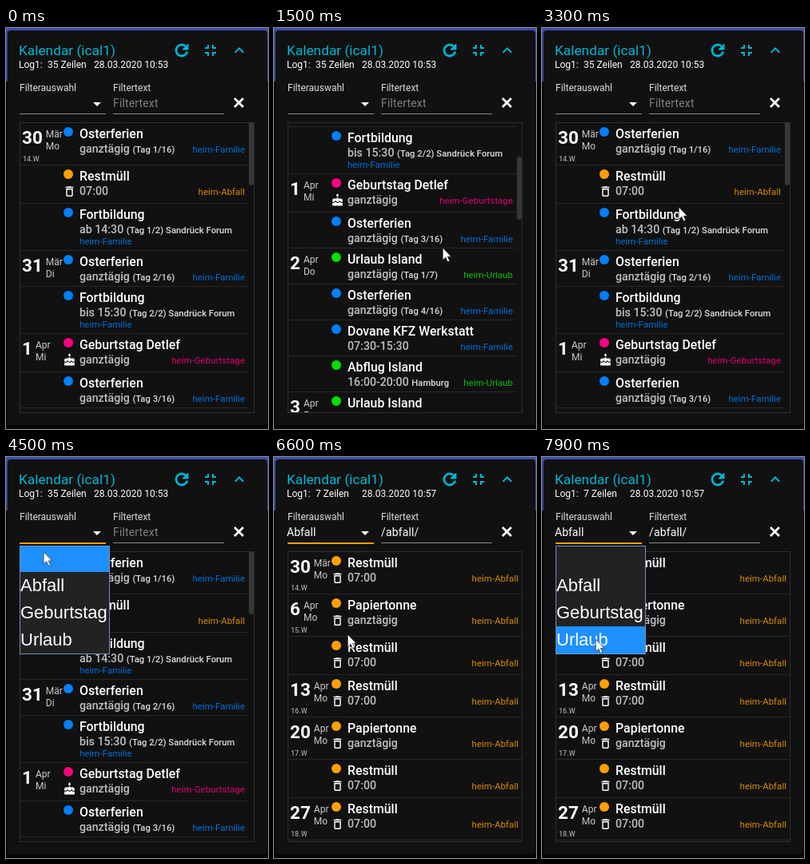
These frames come from a looping animation (328 px wide and 502 px high, 8000 ms). An HTML page:

```html
<!DOCTYPE html>
<html lang="de">
<head>
<meta charset="utf-8">
<title>Kalendar</title>
<style>
@property --y { syntax: "<number>"; inherits: true; initial-value: 0; }

html, body { margin: 0; width: 100%; height: 100%; overflow: hidden; background: #080808; }
#stage { position: relative; width: 328px; height: 502px; overflow: hidden; color: #fff;
  font-family: Roboto, sans-serif; white-space: pre;
  background: linear-gradient(#3f51b5 67px, #080808 67px); }
#stage * { box-sizing: border-box; }
.abs, .row > *, #stage > * { position: absolute; }
svg { display: block; overflow: visible; }

.card { left: 2px; top: 3px; width: 325px; height: 494px; border-radius: 4px; background: #111;
  box-shadow: 0 2px 4px rgba(0, 0, 0, .5); }
.head { left: 16px; top: 18px; font-size: 17.3px; line-height: 20px; color: #00b8d4; }
.log { top: 38px; font-size: 12px; line-height: 16px; }
.label { top: 67px; font-size: 12px; line-height: 16px; color: #ddd; }
.value { top: 86px; font-size: 14px; line-height: 16px; }
.input { left: 134px; letter-spacing: .15px; }
.hint { color: #808080; }
.line { top: 107px; height: 1px; background: #8a8a8a; }
.focus { left: 17px; top: 107px; width: 108px; height: 2px; background: #ffa000; }
.tool { top: 16px; width: 24px; height: 24px; fill: #00b8d4; }

.list { left: 17px; top: 118px; width: 294px; height: 364px; border: 1px solid #2e2e2e; overflow: hidden; }
.rows { left: 0; top: 0; transform: translateY(calc(var(--y) * -1px)); }
#full { width: 285px; }
#waste { width: 292px; }
.thumb { right: 0; top: -1px; width: 6px; height: 79px; border-radius: 3px; background: #363636;
  transform: translateY(calc(var(--y) * .215px)); }

.row { position: relative; border-bottom: 1px solid #282828; }
.date { left: 2px; top: 5px; display: flex; gap: 4px; font-size: 12px; line-height: 15px; color: #ccc; }
.date b { font-size: 22.5px; line-height: 27px; color: #fff; }
.date span { padding-top: 2px; }
.week { left: 3px; top: 39px; font-size: 9px; font-weight: 500; line-height: 12px; color: #a0a0a0; }
.dot { left: 54px; top: 5px; width: 12px; height: 12px; border-radius: 50%; background: var(--c); }
.icon { left: 53px; top: 23.5px; width: 17px; height: 17px; fill: #fff; }
.title, .sub { left: 74px; font-weight: 500; }
.title { top: 4px; font-size: 15.9px; line-height: 19px; }
.sub { top: 23px; font-size: 14.2px; line-height: 18px; color: #c0c0c0; }
.sub small { font-size: 11.3px; color: #dcdcdc; }
.tag { right: 4px; top: 24px; font-size: 11.52px; line-height: 18px; color: var(--c); opacity: .84; }
.long .tag { right: auto; left: 74px; top: 38px; }

.menu { left: 17px; top: 111px; width: 113px; height: 136px; border: 1px solid #7390b8; background: #222;
  overflow: hidden; font: 22px/34px "Liberation Sans", Arial, sans-serif; }
.menu > * { position: absolute; left: 0; top: -2px; }
.pick { width: 100%; height: 34px; background: #1e90ff; }

.cursor { left: 0; top: 0; width: 11px; height: 18px; }

/* 1.25% = 100 ms */
.anim { animation: 8s step-end infinite; }
.scroll { animation-name: scroll; }
.focus { animation-name: focus-on; }
.picked { animation-name: picked-on; }
.unpicked { animation-name: picked-off; }
.loaded { animation-name: loaded-on; }
.unloaded { animation-name: loaded-off; }
.menu { animation-name: menu; }
.pick { animation-name: pick; }
.cursor { animation-name: cursor; }

@keyframes focus-on { 0% { visibility: hidden } 51.25%, 100% { visibility: visible } }
@keyframes picked-on { 0% { visibility: hidden } 63.75%, 100% { visibility: visible } }
@keyframes picked-off { 0% { visibility: visible } 63.75%, 100% { visibility: hidden } }
@keyframes loaded-on { 0% { visibility: hidden } 66.25%, 100% { visibility: visible } }
@keyframes loaded-off { 0% { visibility: visible } 66.25%, 100% { visibility: hidden } }
@keyframes menu {
  0%, 63.75% { visibility: hidden }
  51.25%, 90%, 100% { visibility: visible }
}
@keyframes pick {
  0% { transform: none }
  58.75% { transform: translateY(34px) }
  97.5% { transform: translateY(68px) }
  98.75%, 100% { transform: translateY(102px) }
}
@keyframes scroll {
  0% { --y: 0 }
  13.75% { --y: 60; animation-timing-function: steps(3) }
  17.5% { --y: 180 }
  18.75% { --y: 200 }
  33.75% { --y: 130 }
  35% { --y: 40 }
  36.25%, 100% { --y: 0 }
}
@keyframes cursor {
  0% { transform: translate(277px, 161px); opacity: 0 }
  2.5% { transform: translate(277px, 161px); opacity: 1; animation-timing-function: steps(3) }
  6.25% { transform: translate(211px, 275px) }
  41.25% { transform: translate(171px, 224px); animation-timing-function: steps(4) }
  46.25% { transform: translate(85px, 108px); animation-timing-function: steps(4) }
  51.25% { transform: translate(62px, 92px) }
  52.5% { transform: translate(51px, 92px) }
  55% { transform: translate(49px, 106px); animation-timing-function: steps(4) }
  60% { transform: translate(40px, 156px) }
  75% { transform: translate(60px, 188px); animation-timing-function: steps(2) }
  77.5% { transform: translate(95px, 245px) }
  82.5% { transform: translate(92px, 222px); animation-timing-function: steps(5) }
  88.75% { transform: translate(76px, 87px) }
  95% { transform: translate(74px, 110px); animation-timing-function: steps(3) }
  98.75%, 100% { transform: translate(67px, 228px); opacity: 1 }
}
</style>
</head>
<body>
<div id="stage">
  <div class="card"></div>
  <div class="head">Kalendar (ical1)</div>
  <svg class="tool" style="left:208px" viewBox="0 0 24 24"><path stroke="#00b8d4" stroke-width=".9" d="M17.65 6.35C16.2 4.9 14.21 4 12 4c-4.42 0-7.99 3.58-7.99 8s3.57 8 7.99 8c3.73 0 6.84-2.55 7.73-6h-2.08c-.82 2.33-3.04 4-5.65 4-3.31 0-6-2.69-6-6s2.69-6 6-6c1.66 0 3.14.69 4.22 1.78L13 11h7V4l-2.35 2.35z"/></svg>
  <svg class="tool" style="left:244px" viewBox="0 0 24 24"><path d="M5 16h3v3h2v-5H5v2zm3-8H5v2h5V5H8v3zm6 11h2v-3h3v-2h-5v5zm2-11V5h-2v5h5V8h-3z"/></svg>
  <svg class="tool" style="left:280px" viewBox="0 0 24 24"><path d="M12 8l-6 6 1.41 1.41L12 10.83l4.59 4.58L18 14z"/></svg>

  <div class="log" style="left:16px">Log1:</div>
  <div class="log anim unloaded" style="left:52px">35 Zeilen</div>
  <div class="log anim loaded" style="left:52px">7 Zeilen</div>
  <div class="log anim unloaded" style="left:110px">28.03.2020 10:53</div>
  <div class="log anim loaded" style="left:110px">28.03.2020 10:57</div>

  <div class="label" style="left:17px">Filterauswahl</div>
  <div class="label" style="left:134px">Filtertext</div>
  <div class="value anim picked" style="left:16px">Abfall</div>
  <div class="value input hint anim unpicked">Filtertext</div>
  <div class="value input anim picked">/abfall/</div>
  <svg style="left:109px;top:93px" width="10" height="5"><path fill="#fff" d="M0 0h10L5 5z"/></svg>
  <svg style="left:285px;top:87px" width="13" height="13"><path stroke="#fff" stroke-width="2.8" d="M1 1l11 11M12 1L1 12"/></svg>
  <div class="line" style="left:17px;width:108px"></div>
  <div class="line" style="left:134px;width:139px"></div>
  <div class="focus anim"></div>

  <div class="list anim scroll">
    <div class="abs rows anim unloaded" id="full"></div>
    <div class="abs thumb anim unloaded"></div>
    <div class="abs rows anim loaded" id="waste"></div>
  </div>

  <div class="menu anim">
    <div class="pick anim"></div>
    <div>
Abfall
Geburtstag
Urlaub</div>
  </div>

  <svg class="cursor anim" viewBox="0 0 11 18"><path fill="#fff" stroke="#111" stroke-width=".6" d="M.3.3V15.5L3.9 12.2 6.4 17.7 8.8 16.7 6.4 11.3H10.8z"/></svg>
</div>

<script>
const icons = {
  bin: "M6 19c0 1.1.9 2 2 2h8c1.1 0 2-.9 2-2V7H6v12zM8 9h8v10H8V9zm7.5-5l-1-1h-5l-1 1H5v2h14V4z",
  cake: "M12 6c1.11 0 2-.9 2-2 0-.38-.1-.73-.29-1.03L12 0l-1.71 2.97c-.19.3-.29.65-.29 1.03 0 1.1.9 2 2 2zm4.6 9.99l-1.07-1.07-1.08 1.07c-1.3 1.3-3.58 1.31-4.89 0l-1.07-1.07-1.09 1.07C6.75 16.64 5.88 17 4.96 17c-.73 0-1.4-.23-1.96-.61V21c0 .55.45 1 1 1h16c.55 0 1-.45 1-1v-4.61c-.56.38-1.23.61-1.96.61-.92 0-1.79-.36-2.44-1.01zM18 9h-5V7h-2v2H6c-1.66 0-3 1.34-3 3v1.54c0 1.08.88 1.96 1.96 1.96.52 0 1.02-.2 1.38-.57l2.14-2.13 2.13 2.13c.74.74 2.03.74 2.77 0l2.14-2.13 2.13 2.13c.37.37.86.57 1.38.57 1.08 0 1.96-.88 1.96-1.96V12C21 10.34 19.66 9 18 9z"
};
const kinds = {
  Familie: { color: "#0080ff" },
  Abfall: { color: "#ffa000", icon: "bin" },
  Geburtstage: { color: "#ff0080", icon: "cake" },
  Urlaub: { color: "#00e000" }
};

// date is "day month weekday week"; long rows carry the tag on a third line
function row([date, title, time, note, kind, long]) {
  const { color, icon } = kinds[kind];
  const [day, month, weekday, week] = date.split(" ");
  const height = week ? 53 : long ? 59 : icon ? 48 : 45;
  return `<div class="row ${long ? "long" : ""}" style="height:${height}px;--c:${color}">` +
    (day ? `<div class="date"><b>${day}</b><span>${month}<br>${weekday}</span></div>` : "") +
    (week ? `<div class="week">${week}.W</div>` : "") +
    `<div class="dot"></div>` +
    (icon ? `<svg class="icon" viewBox="0 0 24 24"><path d="${icons[icon]}"/></svg>` : "") +
    `<div class="title">${title}</div>` +
    `<div class="sub">${time} <small>${note}</small></div>` +
    `<div class="tag">heim-${kind}</div></div>`;
}

const allDay = "ganztägig";
const holiday = (date, n) => [date, "Osterferien", allDay, `(Tag ${n}/16)`, "Familie"];
const trip = (date, n) => [date, "Urlaub Island", allDay, `(Tag ${n}/7)`, "Urlaub"];
const course = (time, n) => ["", "Fortbildung", time, `(Tag ${n}/2) Sandrück Forum`, "Familie", true];
const rest = date => [date, "Restmüll", "07:00", "", "Abfall"];
const paper = date => [date, "Papiertonne", allDay, "", "Abfall"];

const fill = (id, rows) => document.getElementById(id).innerHTML = rows.map(row).join("");

fill("full", [
  holiday("30 Mär Mo 14", 1),
  rest(""),
  course("ab 14:30", 1),
  holiday("31 Mär Di", 2),
  course("bis 15:30", 2),
  ["1 Apr Mi", "Geburtstag Detlef", allDay, "", "Geburtstage"],
  holiday("", 3),
  trip("2 Apr Do", 1),
  holiday("", 4),
  ["", "Dovane KFZ Werkstatt", "07:30-15:30", "", "Familie"],
  ["", "Abflug Island", "16:00-20:00", "Hamburg", "Urlaub"],
  trip("3 Apr Fr", 2)
]);
fill("waste", [
  rest("30 Mär Mo 14"),
  paper("6 Apr Mo 15"),
  rest(""),
  rest("13 Apr Mo 16"),
  paper("20 Apr Mo 17"),
  rest(""),
  rest("27 Apr Mo 18")
]);
</script>
</body>
</html>
```
